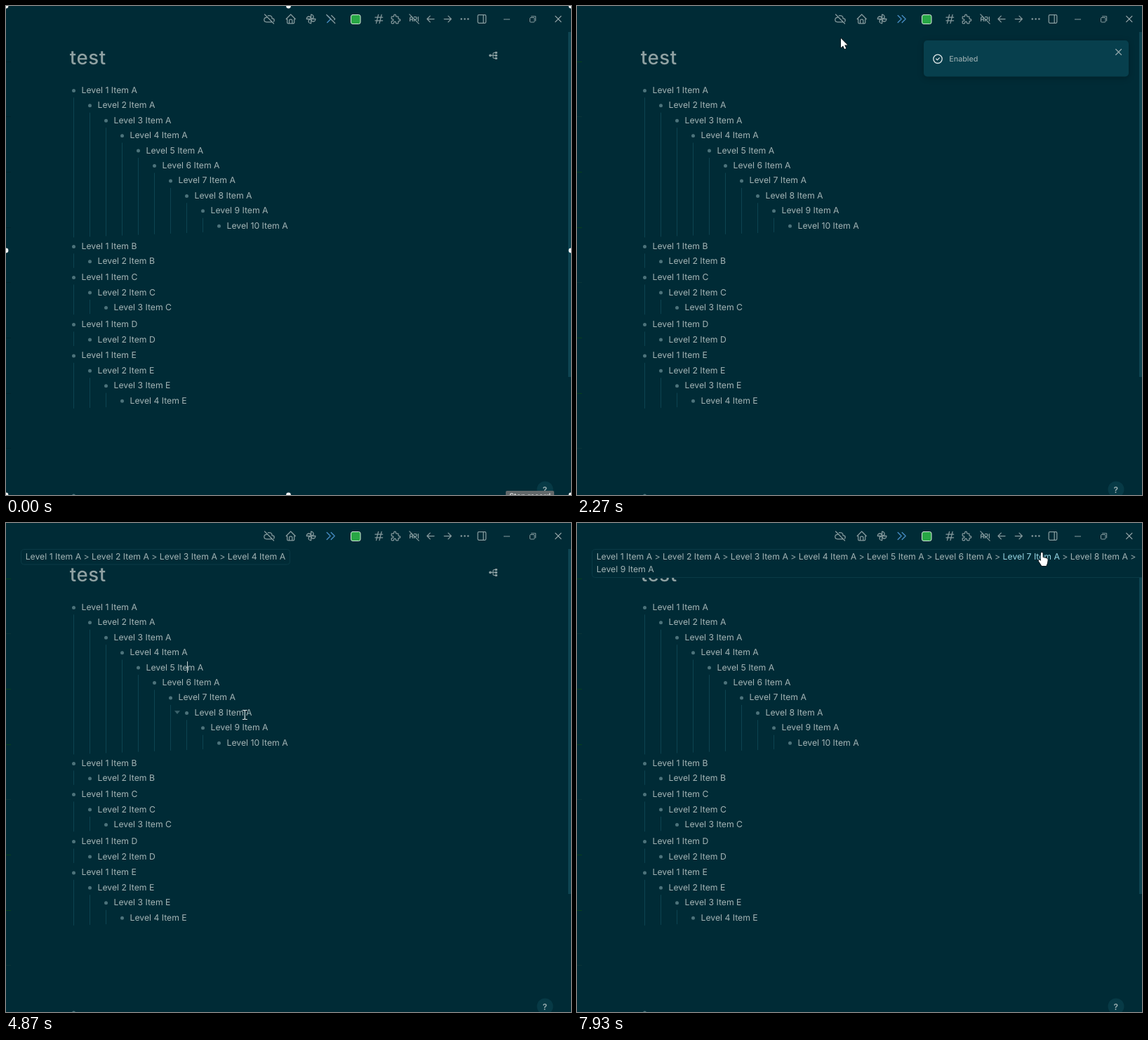
Animation of 805x696 px, one loop 8000 ms. Source, as an HTML page with a canvas:

```html
<!DOCTYPE html>
<html lang="en">
<head>
<meta charset="utf-8">
<title>Outline breadcrumbs</title>
<style>
html, body { margin: 0; width: 100%; height: 100%; overflow: hidden; background: #002b36; }
canvas { display: block; width: 805px; height: 696px; }
</style>
</head>
<body>
<canvas id="stage" width="805" height="696"></canvas>
<script>
const ctx = document.getElementById('stage').getContext('2d');
const W = 805, H = 696, LOOP = 8000;
const BG = '#002b36', TEXT = '#a4b5b6', ICON = '#879b9e', BLUE = '#458bc0';
const SIZE = 12.23, INDENT = 23, ROW = 21.43;
const FAMILY = 'Inter, "Open Sans", sans-serif';

const groups = [['A', 10, 119.3], ['B', 2, 341.3], ['C', 3, 385.5], ['D', 2, 452.5], ['E', 4, 496.8]];

const icons = {
  cloudOff: 'M9.6 5.5c3-1.2 5 .1 6.2 .8c1.5 1.2 2.1 3 1.7 4.8h1c1.9 0 3.5 1.5 3.5 3.4c0 1-.4 1.8-1 2.5M18 18H6.7C4 18 2 16 2 13.5S4 9 6.7 9c.1-.6.3-1.1.7-1.6M3 3l18 18',
  home: 'M5 12H3l9-9l9 9h-2v7a2 2 0 0 1-2 2H7a2 2 0 0 1-2-2v-7M9 21v-6a2 2 0 0 1 2-2h2a2 2 0 0 1 2 2v6',
  hash: 'M5 9h14M5 15h14M11 4l-4 16M17 4l-4 16',
  puzzle: 'M4 7h3a1 1 0 0 0 1-1V5a2 2 0 0 1 4 0v1a1 1 0 0 0 1 1h3a1 1 0 0 1 1 1v3a1 1 0 0 0 1 1h1a2 2 0 0 1 0 4h-1a1 1 0 0 0-1 1v3a1 1 0 0 1-1 1h-3a1 1 0 0 1-1-1v-1a2 2 0 0 0-4 0v1a1 1 0 0 1-1 1H4a1 1 0 0 1-1-1v-3a1 1 0 0 1 1-1h1a2 2 0 0 0 0-4H4a1 1 0 0 1-1-1V8a1 1 0 0 1 1-1',
  apiOff: 'M4 13h5M12 16v-4M12 8h3a2 2 0 0 1 2 2v1l-.6 1.4M15 13h-3M20 8v8M9 16v-5.5a2.5 2.5 0 0 0-5 0V16M3 3l18 18',
  left: 'M5 12h14M5 12l6 6M5 12l6-6',
  right: 'M5 12h14M19 12l-6 6M19 12l-6-6',
  sidebar: 'M4 6a2 2 0 0 1 2-2h12a2 2 0 0 1 2 2v12a2 2 0 0 1-2 2H6a2 2 0 0 1-2-2zM15 4v16',
  cross: 'M6 6l12 12M18 6L6 18',
  check: 'M9 12l2.2 2.2L15.2 10'
};
for (const name in icons) icons[name] = new Path2D(icons[name]);
const petal = new Path2D('M12 12c2.8 0 5-2 5-4.5S14.8 3 12 3z');
const chevrons = new Path2D('M7 7l5 5-5 5M13 7l5 5-5 5');
const chevronsCut = new Path2D('M7 7l5 5-5 5');
const slash = new Path2D('M13 7l5 5-1 1M6 6l12 12');
const arrow = new Path2D('M0 0V13.2L3.1 10.4L5.2 15.2L7.3 14.2L5.2 9.6H9.4z');
const hand = new Path2D('M0 1.5c0-2 2.6-2 2.6 0V7l4.6 1c2 .4 2.7 1.2 2.5 3l-.8 4.5-1.4 3.5H1.2L-3 12.4c-1-1.6.6-2.6 1.8-1.5L0 12z');

// Pointer path: time, x, y
const path = [
  [300, 752, 704], [1350, 460, 15], [1800, 460, 15], [2270, 376, 46], [2650, 376, 46],
  [3400, 259, 208], [3750, 262, 208], [4130, 364, 261], [4600, 372, 282], [5000, 330, 270],
  [5250, 330, 270], [5560, 342, 316], [5800, 342, 316], [6330, 369, 308], [7250, 369, 308],
  [7800, 661, 42], [8000, 661, 42]
];

const edits = [
  { at: 3600, depth: 4, x: 258 },
  { at: 5000, depth: 7, x: 330 },
  { at: 6470, depth: 9, x: 369 }
];

const clamp = v => Math.max(0, Math.min(1, v));
const smooth = v => v * v * (3 - 2 * v);

function pointerAt(t) {
  if (t <= path[0][0]) return [path[0][1], path[0][2]];
  const i = path.findIndex(p => p[0] >= t);
  const a = path[i - 1], b = path[i];
  const k = smooth((t - a[0]) / (b[0] - a[0]));
  return [a[1] + (b[1] - a[1]) * k, a[2] + (b[2] - a[2]) * k];
}

function text(str, x, y, color = TEXT, size = SIZE, weight = 400, spacing = 0) {
  ctx.font = `${weight} ${size}px ${FAMILY}`;
  ctx.letterSpacing = `${spacing}px`;
  ctx.fillStyle = color;
  ctx.fillText(str, x, y);
}

function disc(x, y, r, color) {
  ctx.fillStyle = color;
  ctx.beginPath();
  ctx.arc(x, y, r, 0, 7);
  ctx.fill();
}

function box(x, y, w, h, r, fill, stroke) {
  ctx.beginPath();
  ctx.roundRect(x, y, w, h, r);
  if (fill) { ctx.fillStyle = fill; ctx.fill(); }
  if (stroke) { ctx.strokeStyle = stroke; ctx.lineWidth = 1; ctx.stroke(); }
}

function icon(shape, x, y, scale = 0.72, color = ICON, width = 1.25, turn = 0) {
  ctx.save();
  ctx.translate(x, y);
  ctx.rotate(turn);
  ctx.scale(scale, scale);
  ctx.translate(-12, -12);
  ctx.strokeStyle = color;
  ctx.lineWidth = width / scale;
  ctx.stroke(shape);
  ctx.restore();
}

function toolbar(t) {
  const y = 18.5, on = t >= 1770;
  const [px, py] = pointerAt(t);
  if (px > 448 && px < 476 && py < 32) box(448, 6, 28, 26, 4, '#0a3f4e');
  icon(icons.cloudOff, 375, y);
  icon(icons.home, 405.7, y);
  for (let i = 0; i < 4; i++) icon(petal, 434.6, y, 0.7, ICON, 1.3, i * Math.PI / 2);
  if (on) icon(chevrons, 462.2, y, 1, BLUE, 1.4);
  else {
    icon(chevronsCut, 462.7, y, 1, BLUE, 1.4);
    icon(slash, 462.7, y, 1, ICON, 1.3);
  }
  box(491.5, 12.5, 13.5, 13, 2.5, '#28a745', '#d5e6d9');
  icon(icons.hash, 531.3, y, 0.76);
  icon(icons.puzzle, 555.5, y, 0.7);
  icon(icons.apiOff, 581.5, y, 0.74);
  icon(icons.left, 605, y);
  icon(icons.right, 629.3, y);
  for (let i = -1; i < 2; i++) disc(653.6 + i * 4.8, y, 1.25, ICON);
  icon(icons.sidebar, 678, y);
  ctx.fillStyle = ICON;
  ctx.fillRect(709, 18.5, 9, 1);
  box(746.5, 16.5, 6.5, 6.5, 1, null, ICON);
  ctx.beginPath();
  ctx.moveTo(748.5, 14.7);
  ctx.lineTo(754.7, 14.7);
  ctx.lineTo(754.7, 21);
  ctx.stroke();
  icon(icons.cross, 786.8, y, 0.68, '#a0b0b2', 1.1);
}

function graphIcon() {
  ctx.strokeStyle = ICON;
  ctx.lineWidth = 1.2;
  ctx.beginPath();
  ctx.moveTo(691, 70.3);
  ctx.lineTo(697, 70.3);
  ctx.moveTo(697, 66.5);
  ctx.lineTo(695.5, 66.5);
  ctx.quadraticCurveTo(694, 66.5, 694, 68);
  ctx.lineTo(694, 73);
  ctx.quadraticCurveTo(694, 74.5, 695.5, 74.5);
  ctx.lineTo(697, 74.5);
  ctx.stroke();
  disc(690, 70.3, 1.9, ICON);
  for (const y of [66.5, 70.5, 74.5]) box(696.5, y - 1.4, 3.6, 2.8, 0.8, ICON);
}

function outline() {
  for (const [letter, count, top] of groups) {
    const last = top + (count - 1) * ROW;
    for (let d = 0; d < count; d++) {
      const y = top + d * ROW, x = 96.5 + d * INDENT;
      if (d < count - 1) {
        const end = last + 10 + 0.9 * (count - 2 - d);
        ctx.fillStyle = '#0d4451';
        ctx.fillRect(Math.floor(x), y + 11, 1, end - y - 11);
      }
      disc(x, y + 1.1, 2.5, '#4c737b');
      text(`Level ${d + 1} Item ${letter}`, x + 11, y + 4.6);
    }
  }
}

function foldArrow(t) {
  if (t < 3300 || t > 7350) return;
  const y = pointerAt(t - 90)[1];
  const d = Math.floor((y - 108.5) / ROW);
  if (d < 0 || d > 8) return;
  const x = 83 + d * INDENT, cy = 119.3 + d * ROW;
  ctx.fillStyle = '#3a626b';
  ctx.beginPath();
  ctx.moveTo(x - 4, cy - 2);
  ctx.lineTo(x + 4, cy - 2);
  ctx.lineTo(x, cy + 2.6);
  ctx.fill();
}

function crumbs(t, edit) {
  const left = 27.7, hovered = t > 7700 ? 7 : 0;
  ctx.font = `400 ${SIZE}px ${FAMILY}`;
  ctx.letterSpacing = '0px';
  const parts = [];
  let x = left, line = 0, right = 0;
  for (let i = 1; i <= edit.depth; i++) {
    const label = `Level ${i} Item A`, w = ctx.measureText(label).width;
    if (x + w > 800) { x = left; line++; }
    parts.push([label, x, line, i === hovered ? '#98d7e4' : TEXT]);
    x += w;
    right = Math.max(right, x);
    if (i < edit.depth) {
      parts.push([' > ', x, line, '#93a6a8']);
      x += ctx.measureText(' > ').width;
    }
  }
  const width = line ? W - 15 : right - 15;
  box(21.5, 37.5, width, line ? 40 : 21.5, 4, BG, '#0a3a46');
  for (const [label, px, row, color] of parts) text(label, px, 52 + row * 18.4, color);
}

function caret(t, edit) {
  if ((t - edit.at) % 900 > 540) return;
  ctx.fillStyle = '#c9d3d3';
  ctx.fillRect(edit.x, 111.3 + edit.depth * ROW, 1, 16);
}

function notice(t) {
  const shown = smooth(clamp((t - 1790) / 250)) * (1 - clamp((t - 3800) / 140));
  if (!shown) return;
  ctx.save();
  ctx.globalAlpha = shown;
  if (t < 2100) ctx.translate(8 * (1 - shown), 0);
  ctx.shadowColor = 'rgba(0,0,0,.25)';
  ctx.shadowBlur = 8;
  ctx.shadowOffsetY = 2;
  box(494, 49, 292, 51.5, 5, '#073f4d');
  ctx.shadowColor = 'transparent';
  ctx.strokeStyle = '#dfe8e8';
  ctx.lineWidth = 1.3;
  ctx.beginPath();
  ctx.arc(514, 75.3, 6.2, 0, 7);
  ctx.stroke();
  icon(icons.check, 514, 75.3, 0.72, '#dfe8e8', 1.3);
  text('Enabled', 530.2, 78.8, '#93a8ab', 10.74, 500);
  icon(icons.cross, 771.6, 65.5, 0.66, '#93a8ab', 1.2);
  ctx.restore();
}

function captureFrame() {
  box(712, 690, 69, 12, 2, '#62686a');
  text('Stop record', 717, 700.5, '#d8d8d8', 10.5, 600);
  for (const x of [0, W / 2, W])
    for (const y of [0, H / 2, H])
      if (x !== W / 2 || y !== H / 2) disc(x, y, 3.4, '#f4f6f6');
}

function pointer(t) {
  const [x, y] = pointerAt(t);
  ctx.save();
  ctx.translate(x, y);
  if (t > 3050 && t < 7420) {
    ctx.strokeStyle = '#e6ecec';
    ctx.lineWidth = 1.1;
    ctx.beginPath();
    for (const s of [-1, 1]) {
      ctx.moveTo(-3, s * 6.5);
      ctx.lineTo(-0.8, s * 6.5);
      ctx.lineTo(0, s * 5.7);
      ctx.lineTo(0.8, s * 6.5);
      ctx.lineTo(3, s * 6.5);
    }
    ctx.moveTo(0, -6);
    ctx.lineTo(0, 6);
    ctx.stroke();
  } else {
    const shape = t > 7680 ? hand : arrow;
    ctx.strokeStyle = '#0b1214';
    ctx.lineWidth = 1.4;
    ctx.stroke(shape);
    ctx.fillStyle = '#fff';
    ctx.fill(shape);
  }
  ctx.restore();
}

function draw(t) {
  ctx.fillStyle = BG;
  ctx.fillRect(0, 0, W, H);
  for (let i = 1; i < 9; i++) {
    ctx.fillStyle = t < 70 ? '#01242c' : i % 3 === 2 ? '#0a3438' : '#06401c';
    ctx.fillRect(0, Math.round(i * 78.65), 7, 1);
  }
  ctx.fillStyle = '#0d4552';
  ctx.fillRect(801, 37, 4, 491);

  toolbar(t);
  text('test', 90.8, 83, '#8fa1a2', 27.6, 500, 0.55);
  graphIcon();
  outline();
  foldArrow(t);
  disc(96.5, 697, 2.5, '#4c737b');
  disc(768, 688, 11.5, '#073a46');
  text('?', 764.6, 693, '#9db0b2', 12, 600);

  const edit = edits.filter(e => t >= e.at).pop();
  if (edit) {
    caret(t, edit);
    crumbs(t, edit);
  }
  notice(t);
  if (t < 70) captureFrame();
  pointer(t);
}

ctx.textRendering = 'geometricPrecision';
ctx.lineCap = ctx.lineJoin = 'round';
const start = performance.now();
function tick() {
  draw((performance.now() - start) % LOOP);
  requestAnimationFrame(tick);
}
tick();
</script>
</body>
</html>
```
